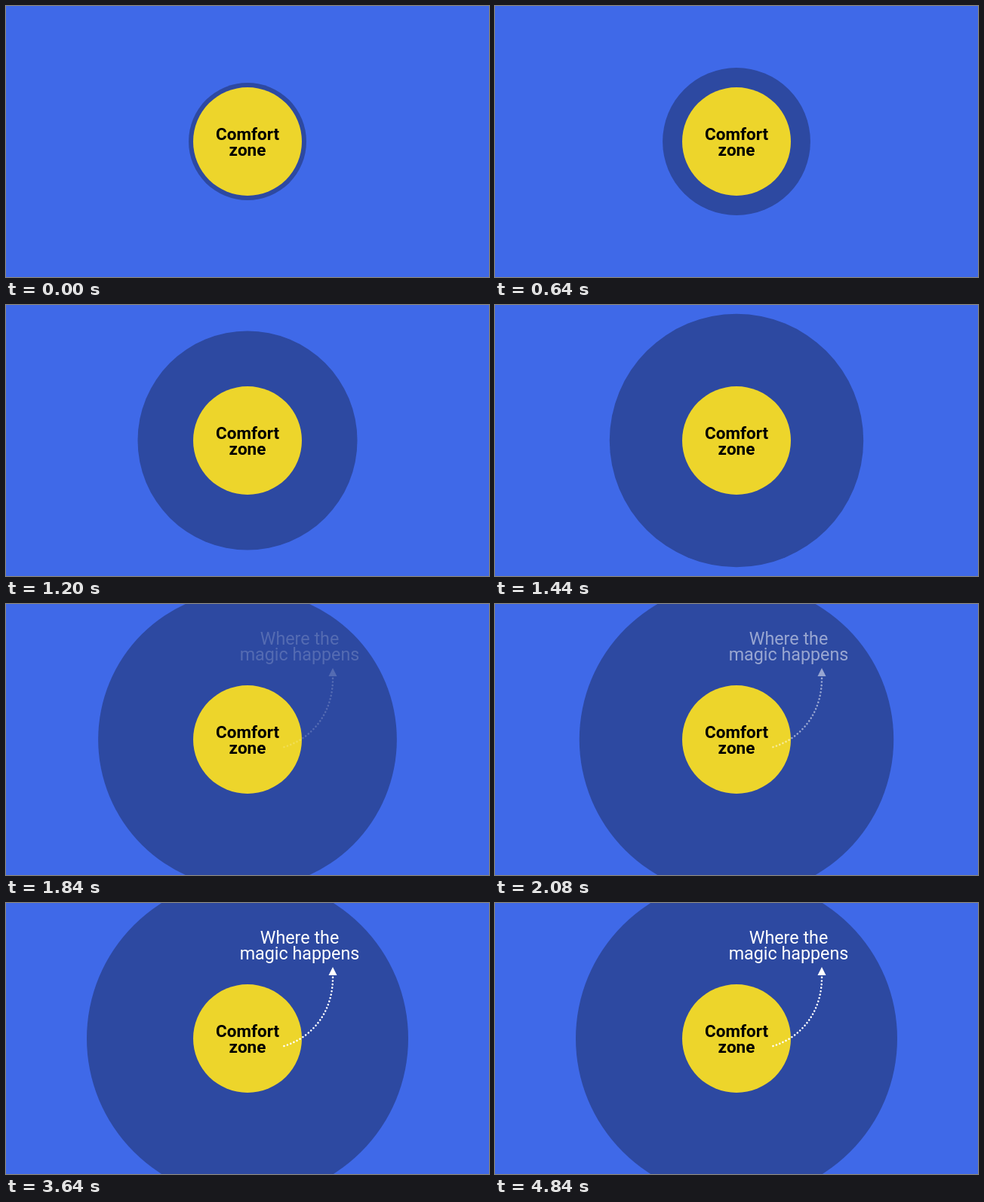
Recreate the animation shown at these times as an HTML page with a canvas. Size 640 by 360 pixels, loop 4920 ms.

```html
<!DOCTYPE html>
<html lang="en">
<head>
<meta charset="utf-8">
<title>Comfort zone</title>
<style>
  html, body { margin: 0; width: 100%; height: 100%; overflow: hidden; background: #3f69e8; }
  canvas { display: block; width: 640px; height: 360px; }
</style>
</head>
<body>
<canvas id="stage" width="640" height="360"></canvas>
<script>
const ctx = document.getElementById('stage').getContext('2d');
const LOOP = 4920, STEP = 40;
const GROW_END = 2400, FADE_START = 1700, FADE_END = 2440;

const clamp = v => Math.min(1, Math.max(0, v));

// Cubic Bezier timing with control points (.42, 0) and (.58, 1)
function easeInOut(x) {
  let lo = 0, hi = 1, s = x;
  for (let i = 0; i < 24; i++) {
    s = (lo + hi) / 2;
    const r = 1 - s;
    const px = 3 * 0.42 * s * r * r + 3 * 0.58 * s * s * r + s * s * s;
    if (px < x) lo = s; else hi = s;
  }
  return s * s * (3 - 2 * s);
}

function disc(radius, color) {
  ctx.fillStyle = color;
  ctx.beginPath();
  ctx.arc(320, 180, radius, 0, Math.PI * 2);
  ctx.fill();
}

function label(lines, x, y, font, color) {
  ctx.font = font + ' Roboto, sans-serif';
  ctx.fillStyle = color;
  ctx.textAlign = 'center';
  lines.forEach((line, i) => ctx.fillText(line, x, y + i * 21));
}

function arrow() {
  ctx.strokeStyle = ctx.fillStyle = '#fff';
  ctx.lineWidth = 2.6;
  ctx.lineCap = 'round';
  ctx.setLineDash([0.01, 4.6]);
  ctx.beginPath();
  ctx.moveTo(368.5, 190);
  ctx.bezierCurveTo(410, 177, 434, 140, 433, 97);
  ctx.stroke();
  ctx.beginPath();
  ctx.moveTo(433, 85);
  ctx.lineTo(438.5, 96);
  ctx.lineTo(427.5, 96);
  ctx.fill();
}

function draw(t) {
  ctx.fillStyle = '#3f69e8';
  ctx.fillRect(0, 0, 640, 360);
  disc(78 + 135 * easeInOut(clamp(t / GROW_END)), '#2d49a1');
  disc(72, '#edd52b');
  label(['Comfort', 'zone'], 320, 178, 'bold 22.5px', '#000');

  ctx.globalAlpha = clamp((t - FADE_START) / (FADE_END - FADE_START));
  label(['Where the', 'magic happens'], 389, 54, '23.3px', '#fff');
  arrow();
  ctx.globalAlpha = 1;
}

const start = performance.now();
function tick() {
  const t = (performance.now() - start) % LOOP;
  draw(Math.floor(t / STEP) * STEP);
  requestAnimationFrame(tick);
}
tick();
</script>
</body>
</html>
```
